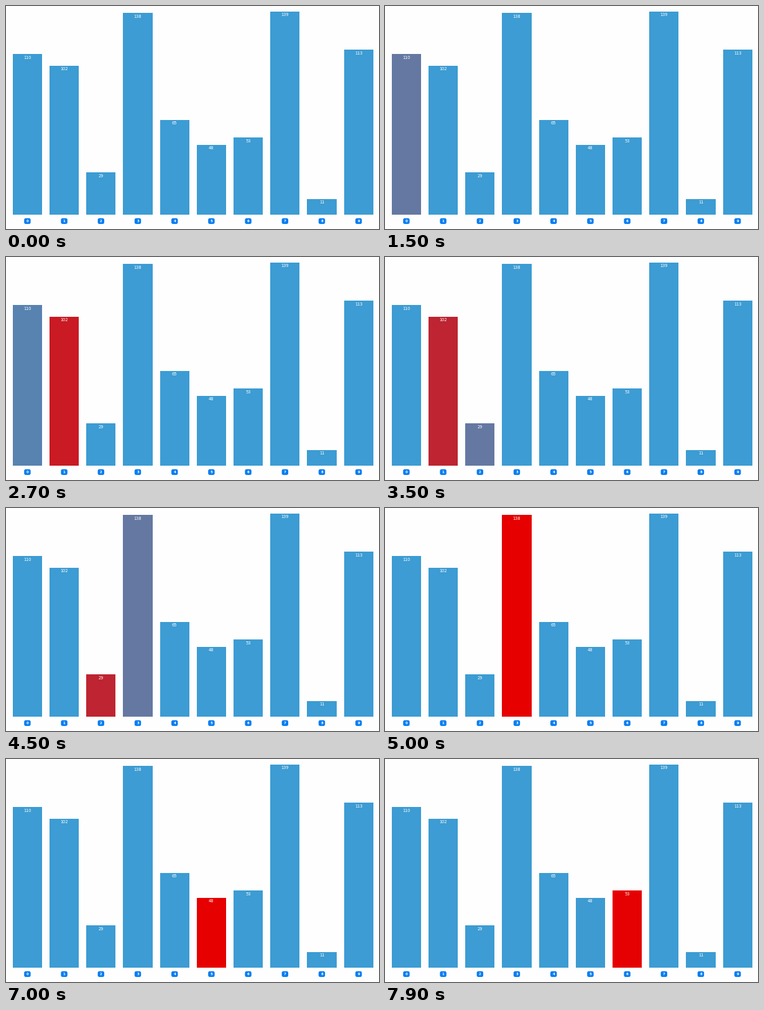
These frames come from a looping animation (600 px wide and 358 px high, 8000 ms). A matplotlib script:

```python
import numpy as np
import matplotlib.pyplot as plt
from matplotlib.animation import FuncAnimation
from matplotlib.patches import FancyBboxPatch, Rectangle

W, H, DPI = 600, 358, 100
STEP, LOOP = 100, 8000
VALUES = [110, 102, 29, 138, 65, 48, 53, 139, 11, 113]
BLUE = np.array([60, 156, 211]) / 255
RED = np.array([230, 0, 0]) / 255
LEFT, PITCH, BAR_W, BASE, UNIT = 10.8, 59.2, 47.2, 335.4, 2.35
FIRST, PERIOD, FADE = 1405, 1000, 550

# CSS "ease" curve, sampled for interpolation
s = np.linspace(0, 1, 200)
EASE_X = 3 * s * (1 - s) ** 2 * 0.25 + 3 * s**2 * (1 - s) * 0.25 + s**3
EASE_Y = 3 * s * (1 - s) ** 2 * 0.1 + 3 * s**2 * (1 - s) + s**3


def px(size):
    return size * 72 / DPI


def ease(t):
    return np.interp(t, EASE_X, EASE_Y)


def heat(i, ms):
    """Share of red in bar i: fades in on its turn, out on the next."""
    start = FIRST + PERIOD * i
    return ease((ms - start) / FADE) - ease((ms - start - PERIOD) / FADE)


fig = plt.figure(figsize=(W / DPI, H / DPI), dpi=DPI, facecolor="#fefefe")
ax = fig.add_axes([0, 0, 1, 1])
ax.set_xlim(0, W)
ax.set_ylim(H, 0)
ax.axis("off")

bars = []
for i, value in enumerate(VALUES):
    x = LEFT + PITCH * i
    mid = x + BAR_W / 2
    top = BASE - UNIT * value
    bar = Rectangle((x, top), BAR_W, BASE - top, facecolor=BLUE, linewidth=0)
    bars.append(ax.add_patch(bar))
    ax.text(mid, top + 7.7, str(value), color="white", ha="center",
            va="baseline", family="DejaVu Sans", size=px(6.6))
    ax.add_patch(FancyBboxPatch(
        (mid - 5.2, 340.7), 10.4, 9.2, facecolor="#047df2", linewidth=0,
        boxstyle="round,pad=0,rounding_size=2.6"))
    ax.text(mid, 347.3, str(i), color="white", ha="center", va="baseline",
            family="DejaVu Sans", weight="bold", size=px(5.4))


def draw(frame):
    for i, bar in enumerate(bars):
        bar.set_facecolor(BLUE + (RED - BLUE) * heat(i, frame * STEP))
    return bars


anim = FuncAnimation(fig, draw, frames=LOOP // STEP, interval=STEP,
                     repeat=True, repeat_delay=0)
plt.show()
```
